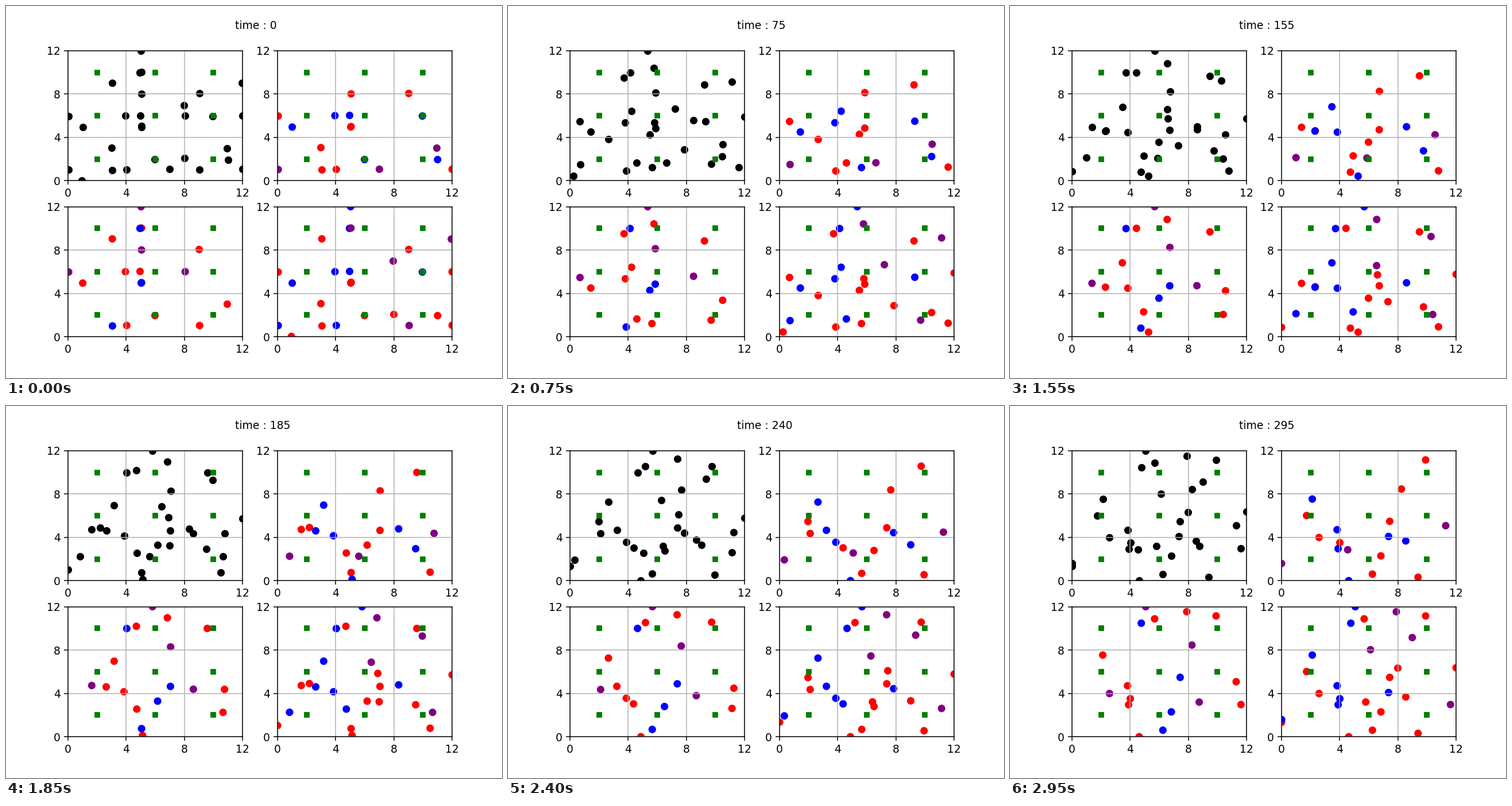
Animation of 864 by 648 pixels, one loop 3000 ms. Source, as a matplotlib script:

```python
import matplotlib.pyplot as plt
import numpy as np
from matplotlib.animation import FuncAnimation

FRAMES, STEP = 60, 5
SPEED = 0.0109
SIZE = 12
COLORS = {"R": "red", "B": "blue", "P": "purple"}
ORDER = "RBP"

agents = []


def walk(kinds, x, y, heading, *turns):
    """Agent walking at constant speed from the grid point (x, y).

    kinds: its colour in each coloured panel, '-' if hidden there.
    heading is in degrees; each turn is (time, new heading).
    """
    agents.append((kinds, x + 1j * y, [(-STEP, heading), *turns]))


walk("-PB", 5, 12, 67, (215, 180))
walk("-BB", 5, 10, 181, (134, 1), (251, 90))
walk("-RP", 5, 10, 28)
walk("-RR", 3, 9, 35)
walk("RRR", 9, 8, 74)
walk("--P", 12, 9, 172, (270, 260))
walk("RP-", 5, 8, 8)
walk("--P", 8, 7, 204, (137, 106))
walk("-P-", 8, 6, 0, (36, 276))
walk("B-B", 10, 6, 216)
walk("--R", 12, 6, 352, (228, 80))
walk("RPR", 0, 6, 322)
walk("BRB", 1, 5, 281, (45, 5))
walk("BRB", 5, 6, 152)
walk("BRB", 4, 6, 180, (15, 272))
walk("--R", 5, 5, 24)
walk("RBR", 5, 5, 350, (213, 84))
walk("RBR", 5, 5, 304)
walk("R-R", 3, 3, 113)
walk("PR-", 11, 3, 177, (44, 86), (167, 1), (231, 88))
walk("B-R", 11, 2, 270, (12, 143))
walk("--R", 8, 2, 99, (110, 181))
walk("R-R", 12, 1, 90, (34, 203))
walk("-RP", 9, 1, 37)
walk("P--", 7, 1, 90, (35, 150))
walk("RRB", 4, 1, 47, (136, 127))
walk("BRR", 6, 2, 245)
walk("RBR", 3, 1, 353)
walk("P-B", 0, 1, 34, (119, 109), (174, 214))
walk("--R", 1, 0, 150, (276, 270))


def position(start, legs, time):
    """Add up the legs walked so far and hold the agent inside the square."""
    point = start
    ends = [t for t, _ in legs[1:]] + [time]
    for (begin, heading), end in zip(legs, ends):
        walked = SPEED * max(0, min(time, end) - begin)
        point += walked * np.exp(1j * np.radians(heading))
    return np.clip([point.real, point.imag], 0, SIZE)


def positions(time):
    return np.array([position(start, legs, time) for _, start, legs in agents])


def members(panel):
    """Agents shown in a panel with their colours, in drawing order."""
    if panel == 0:
        return list(range(len(agents))), "black"
    kinds = [agent[0][panel - 1] for agent in agents]
    shown = sorted((i for i, k in enumerate(kinds) if k != "-"),
                   key=lambda i: ORDER.index(kinds[i]))
    return shown, [COLORS[kinds[i]] for i in shown]


fig, axes = plt.subplots(2, 2, figsize=(6.4, 4.8), dpi=135)
fig.subplots_adjust(bottom=0.111, right=0.8995)
posts_x, posts_y = np.meshgrid(range(2, SIZE, 4), range(2, SIZE, 4))
ticks = range(0, SIZE + 1, 4)
start = positions(0)
panels = []
for panel, ax in enumerate(axes.flat):
    shown, colors = members(panel)
    dots = ax.scatter(*start[shown].T, c=colors)
    ax.scatter(posts_x, posts_y, s=20, c="green", marker="s")
    ax.set(xlim=(0, SIZE), ylim=(0, SIZE), xticks=ticks, yticks=ticks)
    ax.grid(True)
    panels.append((dots, shown))
label = axes[0, 0].text(11.5, 14, "time : 0")


def update(frame):
    time = frame * STEP
    points = positions(time)
    for dots, shown in panels:
        dots.set_offsets(points[shown])
    label.set_text(f"time : {time}")
    return [dots for dots, _ in panels] + [label]


anim = FuncAnimation(fig, update, frames=FRAMES, interval=50,
                     init_func=lambda: update(0), repeat=True, repeat_delay=0)
plt.show()
```
